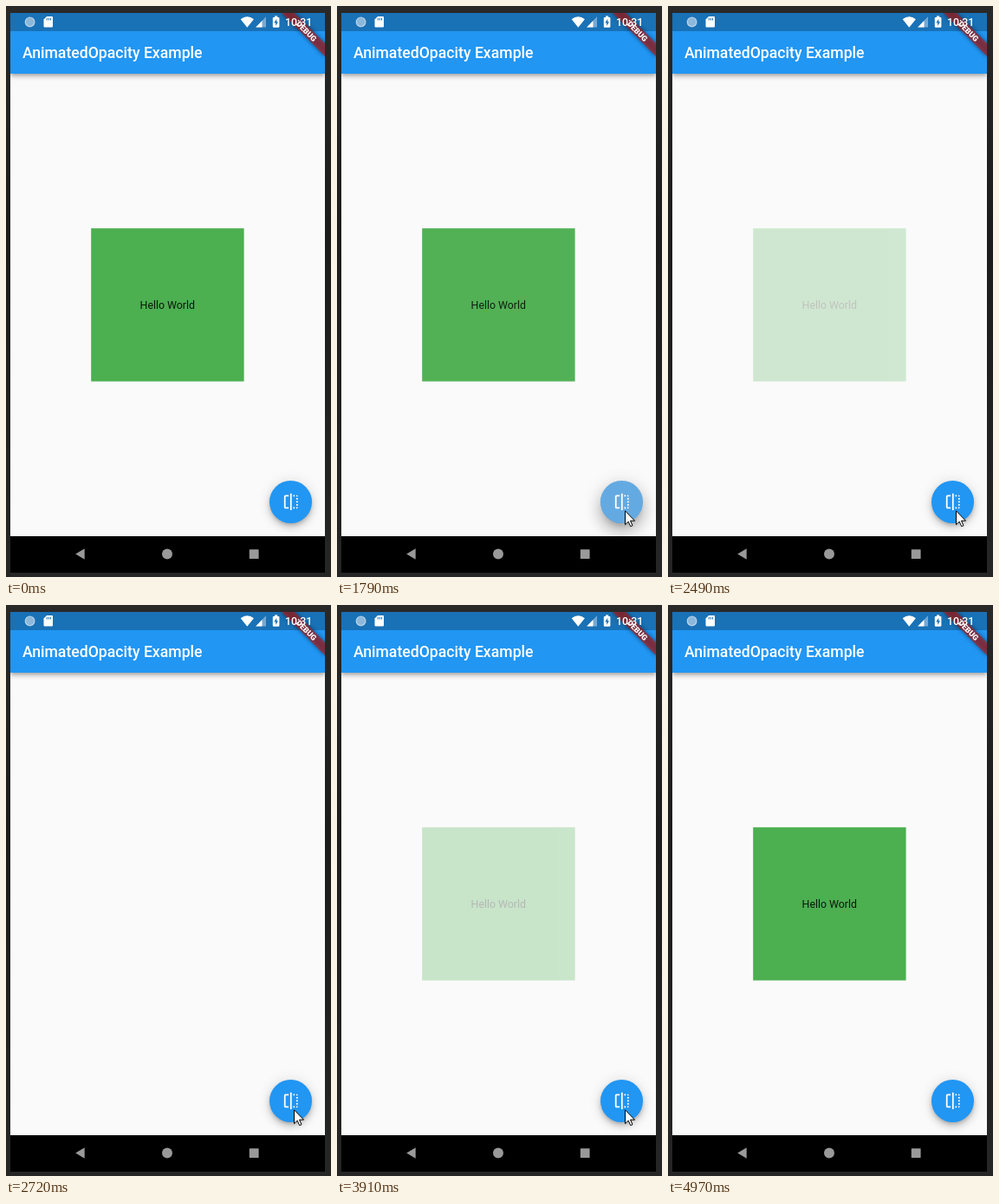
An HTML page that plays this animation: 375 by 658 pixels, repeating every 6360 ms.

```html
<!DOCTYPE html>
<html lang="en">
<head>
<meta charset="utf-8">
<title>Opacity demo</title>
<style>
  html, body { margin: 0; width: 100%; height: 100%; overflow: hidden; background: #232323; }
  svg { position: absolute; left: 0; top: 0; display: block; }
  text { font-family: Roboto, "Noto Sans", sans-serif; }
  #stage { position: absolute; left: 0; top: 0; width: 375px; height: 658px; overflow: hidden;
    background: linear-gradient(#292929, #1c1c1c 40%, #262626); }
  #screen { position: absolute; left: 5px; top: 8px; width: 363px; height: 645px; overflow: hidden; background: #fafafa; }
  #bar { position: absolute; left: 0; top: 0; width: 363px; height: 70px; background: #2196f3;
    box-shadow: 0 2px 3.5px -1px rgba(0,0,0,.2), 0 3.5px 4.4px rgba(0,0,0,.14), 0 1px 9px rgba(0,0,0,.12); }
  #status { height: 21px; background: #1971b6; }
  #fab { position: absolute; left: 299.1px; top: 538.7px; width: 49.4px; height: 49.4px; border-radius: 50%; background: #2196f3; }
  #nav { position: absolute; left: 0; top: 602.5px; width: 363px; height: 43px; background: #000; }
</style>
</head>
<body>
<div id="stage">
  <div id="screen">
    <div id="bar"><div id="status"></div></div>
    <div id="fab"></div>
    <div id="nav"></div>
  </div>
  <svg width="375" height="658" viewBox="0 0 375 658">
    <defs>
      <clipPath id="screenClip"><rect x="5" y="8" width="363" height="645"/></clipPath>
      <clipPath id="fabClip"><circle cx="328.8" cy="571.4" r="24.7"/></clipPath>
      <filter id="soft" x="-20%" y="-80%" width="140%" height="260%"><feGaussianBlur stdDeviation="2.6"/></filter>
    </defs>

    <text x="18.9" y="60.2" font-size="17.64" font-weight="500" fill="#fff">AnimatedOpacity Example</text>

    <g id="box">
      <rect x="98.2" y="256.2" width="176.4" height="176.4" fill="#4caf50"/>
      <text x="186.3" y="348.7" font-size="12.35" text-anchor="middle" fill="#000" fill-opacity=".87">Hello World</text>
    </g>

    <!-- Button contents -->
    <g clip-path="url(#fabClip)">
      <path id="splash" d="M-10-25H10L25-10V10L10 25H-10L-25 10V-10Z" fill="#c8c8c8"/>
    </g>
    <path transform="translate(318.2 560.8) scale(.882)" fill="#fff"
      d="M15 21h2v-2h-2zm4-12h2V7h-2zM3 5v14c0 1.1.9 2 2 2h4v-2H5V5h4V3H5c-1.1 0-2 .9-2 2zm16-2v2h2c0-1.1-.9-2-2-2zm-8 20h2V1h-2zm8-6h2v-2h-2zM15 5h2V3h-2zm4 8h2v-2h-2zm0 8c1.1 0 2-.9 2-2h-2z"/>

    <!-- Ribbon -->
    <g clip-path="url(#screenClip)">
      <g transform="translate(368 8) rotate(45)">
        <rect x="-35.3" y="24.7" width="70.6" height="10.6" fill="#000" opacity=".5" filter="url(#soft)"/>
        <rect x="-35.3" y="24.7" width="70.6" height="10.6" fill="#b71c1c" opacity=".63"/>
        <text x="0" y="33.2" font-size="9" font-weight="900" text-anchor="middle" fill="#fff">DEBUG</text>
      </g>
    </g>

    <!-- Status icons -->
    <g fill="#fff">
      <circle cx="27.6" cy="18.4" r="5.4" fill-opacity=".5" stroke="#fff" stroke-opacity=".55" stroke-width="1.2"/>
      <path d="M47 12h6a1 1 0 0 1 1 1v10.500a1 1 0 0 1-1 1h-8.500a1 1 0 0 1-1-1V15.500Z"/>
      <path d="M47.300 14v2.500M49.400 14v2.500M51.500 14v2.500" stroke="#1971b6" stroke-width="1"/>
      <path d="M278.300 24.700L270.700 15.300Q278.300 9.300 285.900 15.300Z"/>
      <path d="M300 12.300V24.600H288.200Z" fill-opacity=".4"/>
      <path d="M295.500 17V24.600H288.200Z"/>
      <path d="M310 12.900v-1.300h3.200v1.300h1.200a1 1 0 0 1 1 1v9.900a1 1 0 0 1-1 1h-5.600a1 1 0 0 1-1-1v-9.900a1 1 0 0 1 1-1Z"/>
      <path d="M312.300 14.700L309.300 19.400H311.200V23L314 18.300H312.300Z" fill="#1971b6"/>
      <text x="322" y="23" font-size="12.35" font-weight="500">10:31</text>
    </g>

    <!-- Navigation -->
    <g fill="#999">
      <path d="M80.200 631.500L90.700 625.300V637.700Z"/>
      <circle cx="186" cy="631.500" r="6"/>
      <rect x="280.800" y="626.200" width="10.800" height="10.800" rx=".6"/>
    </g>

    <circle id="click" cx="332" cy="581" r="12.200" fill="#f5f000"/>
    <path id="cursor" d="M.5.800V16.700L4.200 13.200L6.700 18.700L9 17.700L6.500 12.200H11.500Z" fill="#fff" stroke="#000" stroke-width="1"/>
  </svg>
</div>
<script>
const LOOP = 6360;
const $ = id => document.getElementById(id);
const box = $('box'), fab = $('fab'), splash = $('splash'), click = $('click'), cursor = $('cursor');

const bursts = [[300, 620, 5], [770, 860, 2], [1470, 2100, 9], [2190, 2340, 3], [2490, 2570, 2],
  [2720, 2720, 1], [3340, 3910, 8], [3970, 3970, 1], [4050, 4600, 8], [4740, 4970, 4]];
const ticks = bursts.flatMap(([a, b, n]) =>
  Array.from({ length: n }, (_, i) => n > 1 ? a + (b - a) * i / (n - 1) : a));

// Pointer path: time, x, y
const path = [[299, 317, 662], [300, 317, 648], [620, 325, 591], [770, 329, 585], [860, 332, 581],
  [4660, 332, 581], [4890, 310, 648], [4970, 308, 664]];
const presses = [1470, 3340];

const clamp = v => Math.max(0, Math.min(1, v));
const ramp = (t, from, to) => clamp((t - from) / (to - from));
const mix = (a, b, k) => a + (b - a) * k;
const snap = t => ticks.reduce((last, k) => k <= t ? k : last, 0);

function pointer(t) {
  const i = path.findIndex(p => p[0] > t);
  if (i < 0) return path[path.length - 1].slice(1);
  if (i === 0) return path[0].slice(1);
  const [a, b] = [path[i - 1], path[i]], k = ramp(t, a[0], b[0]);
  return [mix(a[1], b[1], k), mix(a[2], b[2], k)];
}

function shadow(k) {
  const layer = (y, blur, spread, alpha) => `0 ${y}px ${blur}px ${spread}px rgba(0,0,0,${alpha})`;
  return [
    layer(mix(2.6, 6.2, k), mix(4.4, 7, k), mix(-.9, -3.5, k), .2),
    layer(mix(5.3, 10.6, k), mix(8.8, 15, k), mix(0, 1.8, k), .14),
    layer(mix(.9, 4.4, k), mix(15.9, 19.4, k), mix(0, 3.5, k), .12)
  ].join();
}

function draw(t) {
  box.style.opacity = 1 - ramp(t, 1752, 2720) + ramp(t, 3640, 4600);

  const start = t < presses[1] ? presses[0] : presses[1];
  const age = t - start;
  click.style.opacity = age < 0 ? 0 : .5 * (1 - ramp(age, 160, 300));

  const grow = ramp(age, 280, 314);
  splash.setAttribute('transform', `translate(328.8 571.4) scale(${grow})`);
  splash.style.opacity = .4 * (1 - ramp(age, 320, 530));
  fab.style.boxShadow = shadow(grow * (1 - ramp(age, 390, 560)));

  cursor.setAttribute('transform', `translate(${pointer(t)})`);
}

function frame(now) {
  draw(snap(now % LOOP));
  requestAnimationFrame(frame);
}
draw(0);
requestAnimationFrame(frame);
</script>
</body>
</html>
```
